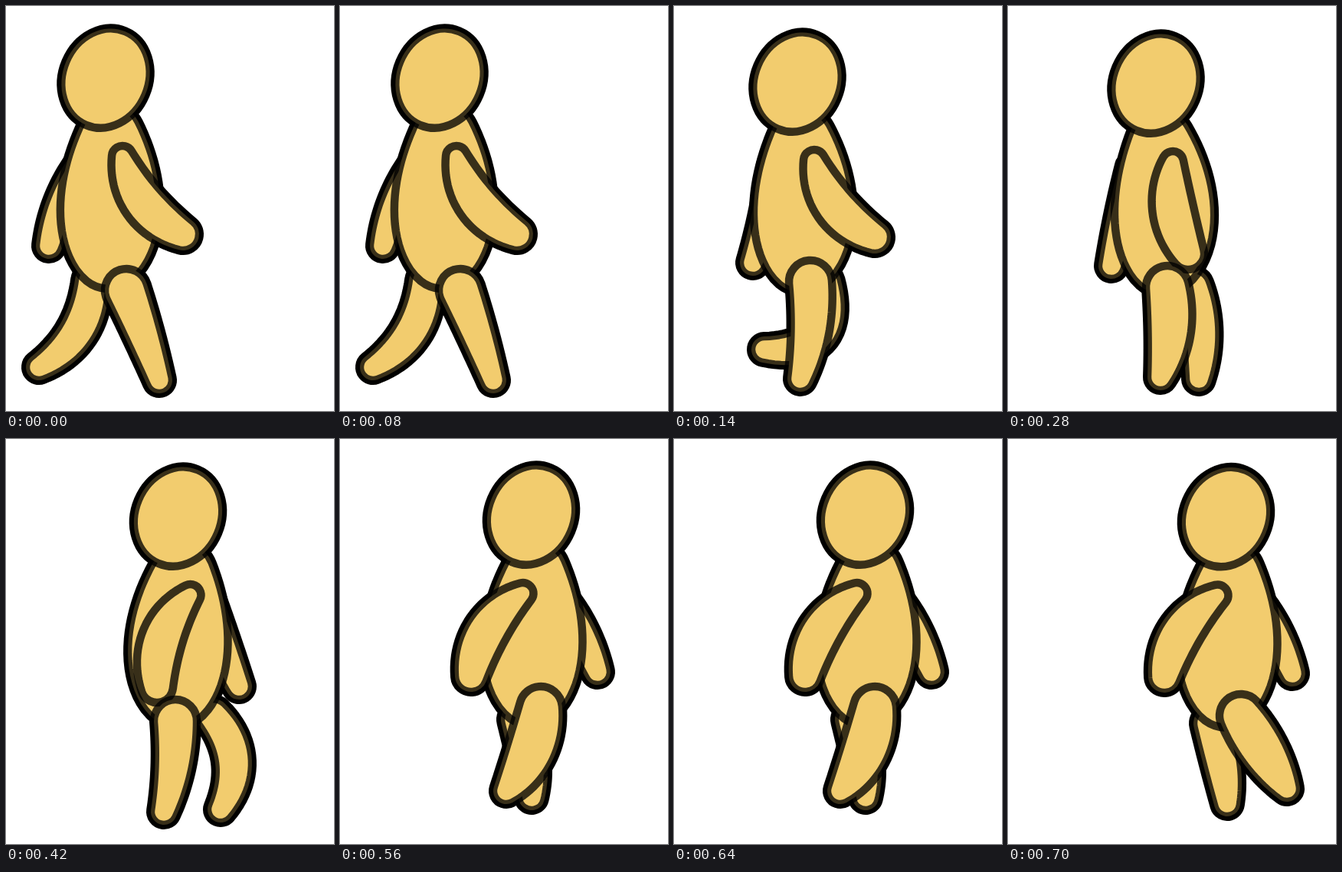
An HTML page with a canvas that plays this animation: 428x527 px, repeating every 840 ms.

```html
<!DOCTYPE html>
<html lang="en">
<head>
<meta charset="utf-8">
<title>Walk cycle</title>
<style>
  html, body { margin: 0; width: 100%; height: 100%; overflow: hidden; background: #fff; }
  canvas { display: block; }
</style>
</head>
<body>
<canvas id="stage" width="428" height="527"></canvas>
<script>
const ctx = document.getElementById('stage').getContext('2d');
const STEP = 140;
const SKIN = '#f2cc6e';
const INK = '#060502';
const GLAZE = 'rgba(0,0,0,0.77)';

// Key poses. Hands: x, y, bend. Legs: hip x, y, foot x, y, bend, with the near knee's radius last.
// The shoulder and the body's lean are measured from the head.
const poses = [
  { head: [130, 94], lean: 6, shoulder: 22, nearHand: [231, 297, 15], farHand: [56, 312, 2],
    nearLeg: [157, 370, 200, 487, -1, 23], farLeg: [112, 358, 43, 470, -18] },
  { head: [161, 99], lean: 8, shoulder: 22, nearHand: [262, 301, 15], farHand: [103, 334, -8],
    nearLeg: [178, 359, 165, 485, -6, 25], farLeg: [196, 360, 118, 447, -39] },
  { head: [193, 101], lean: 11, shoulder: 22, nearHand: [235, 322, 10], farHand: [135, 338, -4],
    nearLeg: [208, 366, 199, 483, -7, 28], farLeg: [242, 365, 249, 485, -6] },
  { head: [224.5, 101], lean: 0, shoulder: 16, nearHand: [197, 322, 15], farHand: [304, 322, 5],
    nearLeg: [221, 367, 206, 485, -5, 24], farLeg: [270, 360, 280, 482, -22] },
  { head: [249.5, 99], lean: 2, shoulder: -11, nearHand: [171, 308, 14], farHand: [336, 303, 0],
    nearLeg: [262, 350, 217, 458, -9, 31], farLeg: [232, 365, 250, 466, -5] },
  { head: [284.5, 101.5], lean: 2, shoulder: -11, nearHand: [204, 309, 14], farHand: [371, 305, 0],
    nearLeg: [304, 360, 364, 455, 0, 30], farLeg: [264, 370, 286, 474, -4] }
];

// Quadratic through three values at t = 0, 0.5 and 1, and its slope.
const curve = ([a, b, c], t) =>
  a * (2 * t - 1) * (t - 1) + 4 * b * t * (1 - t) + c * t * (2 * t - 1);
const slope = ([a, b, c], t) => a * (4 * t - 3) + b * (4 - 8 * t) + c * (4 * t - 1);

// Outline swept by a circle that moves along a curve while its radius changes.
function sweep(xs, ys, radii) {
  const path = new Path2D();
  const at = t => {
    const dx = slope(xs, t), dy = slope(ys, t);
    const ratio = -slope(radii, t) / Math.hypot(dx, dy);
    return {
      x: curve(xs, t), y: curve(ys, t), r: curve(radii, t),
      heading: Math.atan2(dy, dx),
      spread: Math.acos(Math.max(-1, Math.min(1, ratio)))
    };
  };
  const edge = (p, side) => {
    const angle = p.heading + side * p.spread;
    path.lineTo(p.x + p.r * Math.cos(angle), p.y + p.r * Math.sin(angle));
  };
  const cap = (p, side) =>
    path.arc(p.x, p.y, p.r, p.heading + side * p.spread, p.heading - side * p.spread, true);

  const spine = Array.from({ length: 25 }, (_, i) => at(i / 24));
  for (const p of spine) edge(p, 1);
  cap(spine[24], 1);
  for (const p of spine.reverse()) edge(p, -1);
  cap(spine[24], -1);
  path.closePath();
  return path;
}

// Bend pushes the middle joint sideways from the straight line.
function limb(x, y, endX, endY, bend, radii) {
  const dx = endX - x, dy = endY - y;
  const push = bend / Math.hypot(dx, dy);
  return sweep(
    [x, (x + endX) / 2 - dy * push, endX],
    [y, (y + endY) / 2 + dx * push, endY],
    radii);
}

// Parts from back to front.
function build({ head: [x, y], lean, shoulder, nearHand, farHand, nearLeg, farLeg }) {
  const farShoulder = 5 + 43 * Math.sign(farHand[0] - x);
  const knee = nearLeg[5];
  const face = new Path2D();
  face.ellipse(x, y, 56, 66, 0.4, 0, Math.PI * 2);
  return [
    limb(x + farShoulder, y + 107, ...farHand, [10, 19, 17]),
    limb(...farLeg, [22, 24, 17]),
    sweep([x + 6, x + lean, x + lean - 2], [y + 75, y + 165, y + 228], [41, 65, 46]),
    limb(x + shoulder, y + 102, ...nearHand, [14, 27, 21]),
    limb(...nearLeg.slice(0, 5), [28, knee, 17]),
    face
  ];
}

const figures = poses.map(build);

function ink(path, width, style) {
  ctx.lineWidth = width;
  ctx.strokeStyle = style;
  ctx.stroke(path);
}

function draw(parts) {
  ctx.fillStyle = '#fff';
  ctx.fillRect(0, 0, 428, 527);
  ctx.lineJoin = 'round';
  for (const part of parts) ink(part, 12, INK);
  for (const part of parts) {
    ctx.fillStyle = SKIN;
    ctx.fill(part);
    ink(part, 10.5, GLAZE);
  }
}

const start = performance.now();

function tick() {
  const time = performance.now() - start;
  draw(figures[Math.floor(time / STEP) % figures.length]);
  requestAnimationFrame(tick);
}
tick();
</script>
</body>
</html>
```
